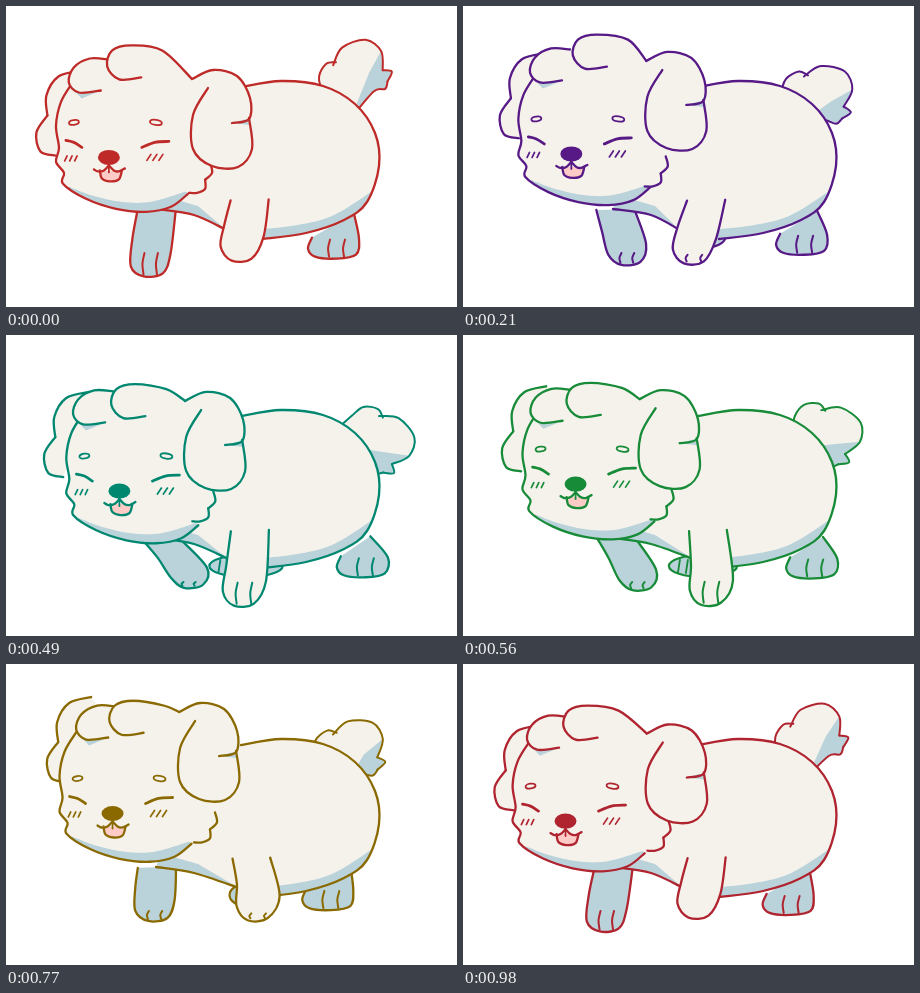
An HTML page with a canvas for the animation above (1.05 s loop, 451 px wide and 301 px high).

```html
<!DOCTYPE html>
<html lang="en">
<head>
<meta charset="utf-8">
<title>Running puppy</title>
<style>
html, body { margin: 0; width: 100%; height: 100%; overflow: hidden; background: #fff; }
canvas { display: block; }
</style>
</head>
<body>
<canvas id="stage" width="451" height="301"></canvas>
<script>
const ctx = document.getElementById('stage').getContext('2d');
const STEP = 70, COUNT = 15;
const FUR = '#f5f2ec', SHADE = '#bad3da', TONGUE = '#ffcbc6';

// Ink colour stops by step, blended in between
const INK = new Map([
  [0, [190, 42, 40]], [2, [130, 0, 130]], [5, [0, 75, 143]], [7, [0, 135, 112]],
  [9, [45, 142, 0]], [11, [138, 106, 0]], [14, [176, 36, 48]], [15, [190, 42, 40]]
]);

// Gait: cosine and sine of the stride, then of the double-time bounce, for x and y
const GAIT = {
  face: [[-5, 2], [-0.4, 1.3, 3.2, -4.1]],
  marks: [[-5.1, 2], [-0.6, 0.9, 0, -8.1]],
  cheek: [[-1.9, -2.8], [0.6, 1, 3.2, -1.9]],
  curl: [[-1.6, 3.8, -2.2], [-4.8, -3, 5.2, -3.1]],
  tuft: [[-2.2, -1, -2], [-1.3, 0.6, 5.8, -1.7]],
  farEar: [[-4.1, -1.2, -2.5, 0.5], [4.8, 6.2, 9.7, -3.9]],
  ear: [[4, 4.4, 2, -0.8], [3.6, 2.2, 9.4, -1.1]],
  nearLeg: [[-3.7, -11.2, 0.3, 6.6], [-8, 2.1, 2.6]],
  farLeg: [[-18.2, 12.8, 1, -4], [8.1, -1.5, 3.2, 2.3]],
  hindLeg: [[-12.8, 11.7, 3.8, -3.4], [4.9, 0, 0.7, 1.4]],
  tail: [[-16.7, 11.6, 1.9, -6.5], [-24.6, 9.8, -3.3, -8.6]]
};
const TAIL_TURN = [-0.55, 0.24, -0.02, -0.165];
const PAW_REACH = [-14.7, 6.1];

const pairs = (...n) => Array.from({ length: n.length / 2 }, (_, i) => n.slice(2 * i, 2 * i + 2));

// Resting outlines
const bodyTop = pairs(235,81, 275,75, 317,80, 349,98, 369,127, 373,160, 361,196, 338,214, 300,227, 256,233);
const faceEdge = pairs(72,73, 60,93, 55,117, 58,139, 55,153, 63,164, 62,175, 85,190, 115,200, 145,203, 170,198, 187,185);
const chinEdge = pairs(68,178, 92,187, 120,193, 150,193, 187,182);
const cheekTop = pairs(206,153, 208,163, 201,170);
const cheekLow = pairs(201,170, 201,179, 193,183, 185,183);
const farEarTop = pairs(81,50, 59,56, 47,75, 48,95);
const farEarLow = pairs(48,95, 37,112, 41,131, 56,135);
const tuftEdge = pairs(107,49, 88,48, 72,57, 67,72, 77,82, 99,80);
const curlEdge = pairs(139,71, 117,73, 105,60, 110,44, 129,39, 160,44);
const earFold = pairs(180,60, 201,51, 225,57, 238,79, 237,100, 220,104);
const earFlap = pairs(237,99, 240,130, 226,148, 200,147, 181,130, 181,96, 196,69);
const nearLeg = pairs(225,195, 221,223, 218,246, 229,260, 249,258, 261,236, 263,194);
const farLeg = pairs(133,204, 137,226, 142,249, 155,259, 174,256, 180,238, 171,203);
const hindLeg = pairs(315,226, 311,237, 318,245, 339,247, 359,243, 362,227, 353,204);
const tailBumps = [
  pairs(-51,10, -47,-4, -34,-11, -25,-7),
  pairs(-29,-6, -12,-16, 12,-10, 19,8, 10,25),
  pairs(10,25, 17,31, 8,37),
  pairs(8,37, 2,42, -9,38)
];

const move = (pts, [dx, dy]) => pts.map(([x, y]) => [x + dx, y + dy]);
const mix = (a, b, k) => a.map((v, i) => v + (b[i] - v) * k);
const clamp = (v, lo, hi) => Math.min(hi, Math.max(lo, v));

let angle = 0;
const wave = ([c1, s1, c2 = 0, s2 = 0]) =>
  c1 * Math.cos(angle) + s1 * Math.sin(angle) + c2 * Math.cos(2 * angle) + s2 * Math.sin(2 * angle);
const sway = name => GAIT[name].map(wave);

// The foot follows the gait fully, the hip stays put
function stride(pts, name, hip) {
  const [dx, dy] = sway(name);
  return pts.map(([x, y]) => {
    const k = clamp((y - hip) / 42, 0, 1);
    return [x + dx * k, y + dy * k];
  });
}

function inkAt(step) {
  const stops = [...INK];
  const i = stops.findIndex(([s]) => s > step);
  const [[s0, c0], [s1, c1]] = stops.slice(i - 1, i + 1);
  return `rgb(${mix(c0, c1, (step - s0) / (s1 - s0)).map(Math.round)})`;
}

// Smooth curve through the points, joined to the current path
function curve(p) {
  ctx.lineTo(...p[0]);
  for (let i = 0; i < p.length - 1; i++) {
    const a = p[i - 1] || p[i], b = p[i], c = p[i + 1], d = p[i + 2] || c;
    ctx.bezierCurveTo(b[0] + (c[0] - a[0]) / 6, b[1] + (c[1] - a[1]) / 6,
      c[0] - (d[0] - b[0]) / 6, c[1] - (d[1] - b[1]) / 6, c[0], c[1]);
  }
}

function fill(color, ...curves) {
  ctx.beginPath();
  curves.forEach(curve);
  ctx.fillStyle = color;
  ctx.fill();
}

function line(pts, width = 2.3) {
  ctx.beginPath();
  curve(pts);
  ctx.lineWidth = width;
  ctx.stroke();
}

function shape(pts, color) {
  fill(color, pts);
  line(pts);
}

function clipped(outline, draw) {
  ctx.save();
  ctx.beginPath();
  outline.forEach(curve);
  ctx.clip();
  draw();
  ctx.restore();
}

function oval([x, y], rx, ry, turn = 0) {
  ctx.beginPath();
  ctx.ellipse(x, y, rx, ry, turn, 0, Math.PI * 2);
}

function drawLeg(pts, color, toe) {
  shape(pts, color);
  if (toe < 3) return;
  const y = Math.max(pts[3][1], pts[4][1]) - 2;
  for (const k of [0.32, 0.66]) {
    const x = pts[2][0] + (pts[5][0] - pts[2][0]) * k;
    line([[x + 1, y - toe], [x - 1, y - toe / 2], [x, y]], 2);
  }
}

function drawHiddenPaw() {
  const reach = 21 + wave(PAW_REACH);
  oval([240, 231], reach, 11);
  ctx.fillStyle = SHADE;
  ctx.fill();
  ctx.lineWidth = 2.2;
  ctx.stroke();
  for (const dx of [9, 17]) line([[242 - reach + dx, 225], [240 - reach + dx, 238]], 1.8);
}

function drawTail() {
  const turn = wave(TAIL_TURN), c = Math.cos(turn), s = Math.sin(turn);
  const [dx, dy] = sway('tail');
  const [tip, top, low, end] = tailBumps.map(b =>
    b.map(([x, y]) => [369.6 + dx + x * c - y * s, 76.5 + dy + x * s + y * c]));
  tip.unshift([330, 95]);
  end.push([345, 112]);
  fill(FUR, tip, top, low, end);
  fill(SHADE, [top[3], top[4]], low, end, [mix(mix(top[4], end[2], 0.5), top[1], 0.25)]);
  [tip, top, low, end].forEach(b => line(b, 2));
}

function drawBody(knee) {
  const belly = [[150, 203], [188, 209], [knee[0] + 2, 224]];
  const outline = [bodyTop, [...belly].reverse(), [[185, 110]]];
  fill(FUR, ...outline);
  clipped(outline, () => {
    fill(SHADE, pairs(245,224, 285,220, 326,210, 368,184), pairs(370,245, 245,245));
    fill(SHADE, belly, pairs(192,200, 150,188));
  });
  line(bodyTop);
  line(belly);
}

function drawHead() {
  const shift = sway('face');
  const face = move(faceEdge, shift), chin = move(chinEdge, shift);
  const cheeks = [cheekTop, cheekLow].map(c => move(c, sway('cheek')));
  const tuft = move(tuftEdge, sway('tuft'));
  const [fold, flap] = [earFold, earFlap].map(c => move(c, sway('ear')));
  const curl = [...move(curlEdge, sway('curl')), fold[0]];

  const farEar = [farEarTop, farEarLow].map(c => move(c, sway('farEar')));
  fill(FUR, ...farEar, [tuft[4], tuft[1]]);
  farEar.forEach(c => line(c));

  const back = cheeks.map(c => [...c].reverse()).reverse();
  const crown = [flap[3], flap[6], fold[1], fold[0], curl[4], tuft[0], tuft[2]];
  ctx.beginPath();
  [face, ...back].forEach(curve);
  crown.forEach(pt => ctx.lineTo(...pt));
  ctx.fillStyle = FUR;
  ctx.fill();
  clipped([face], () => fill(SHADE, chin, [[215, 215], [40, 215]]));
  fill(SHADE, tuft.slice(3), move([tuft[4], tuft[3]], [3, 6]));
  line(face);
  cheeks.forEach(c => line(c));
  shape(tuft, FUR);
  shape(curl, FUR);

  fill(FUR, fold, flap);
  fill(FUR, flap);
  fill(SHADE, [fold[5], fold[4], [fold[4][0] + 1, fold[4][1] + 6]]);
  line(flap);
  line(fold);
}

function drawFace(ink) {
  const [nose, eyeL, eyeR, browL, browR, blushL, blushR] =
    move(pairs(108,152, 73,138, 154,138, 73,117, 155,117, 70,153, 154,152), sway('marks'));
  line(move(pairs(-8,-3, 0,-1, 8,4), eyeL), 2.8);
  line(move(pairs(-13,4, 0,-1, 14,-2), eyeR), 2.8);

  ctx.lineWidth = 1.8;
  oval(browL, 5, 2.4, -0.15);
  ctx.stroke();
  oval(browR, 6, 2.6, 0.15);
  ctx.stroke();

  for (const dx of [-5, 0, 5]) {
    line(move([[dx + 1.2, -2.5], [dx - 1.2, 2.5]], blushL), 1.7);
    line(move([[dx * 1.2 + 2, -3], [dx * 1.2 - 2, 3]], blushR), 1.7);
  }

  shape(move(pairs(-9,13, -7,21, 1,24, 10,22, 13,13), nose), TONGUE);
  fill(FUR, move(pairs(-11,13, -4,13, 0,8, 5,13, 13,13), nose));
  line(move(pairs(-15,12, -11,14, -5,13, 0,8), nose));
  line(move(pairs(0,8, 5,13, 10,14, 16,11), nose));
  line(move(pairs(0,6, 0,15), nose), 1.8);
  ctx.fillStyle = ink;
  oval(nose, 11, 7.5);
  ctx.fill();
}

function draw(now) {
  const step = Math.floor(now / STEP) % COUNT;
  angle = step / COUNT * Math.PI * 2;
  const ink = inkAt(step);
  ctx.fillStyle = '#fff';
  ctx.fillRect(0, 0, 451, 301);
  ctx.strokeStyle = ink;
  ctx.lineCap = ctx.lineJoin = 'round';

  const near = stride(nearLeg, 'nearLeg', 190);
  const far = stride(farLeg, 'farLeg', 200);
  drawTail();
  drawHiddenPaw();
  drawLeg(stride(hindLeg, 'hindLeg', 180), SHADE, 17);
  drawLeg(far, SHADE, far[3][1] - 249);
  drawBody(near[1]);
  drawLeg(near, FUR, clamp((near[3][1] - 253) * 1.5, 0, 21));
  drawHead();
  drawFace(ink);
}

const start = performance.now();
function tick() {
  draw(performance.now() - start);
  requestAnimationFrame(tick);
}
tick();
</script>
</body>
</html>
```
